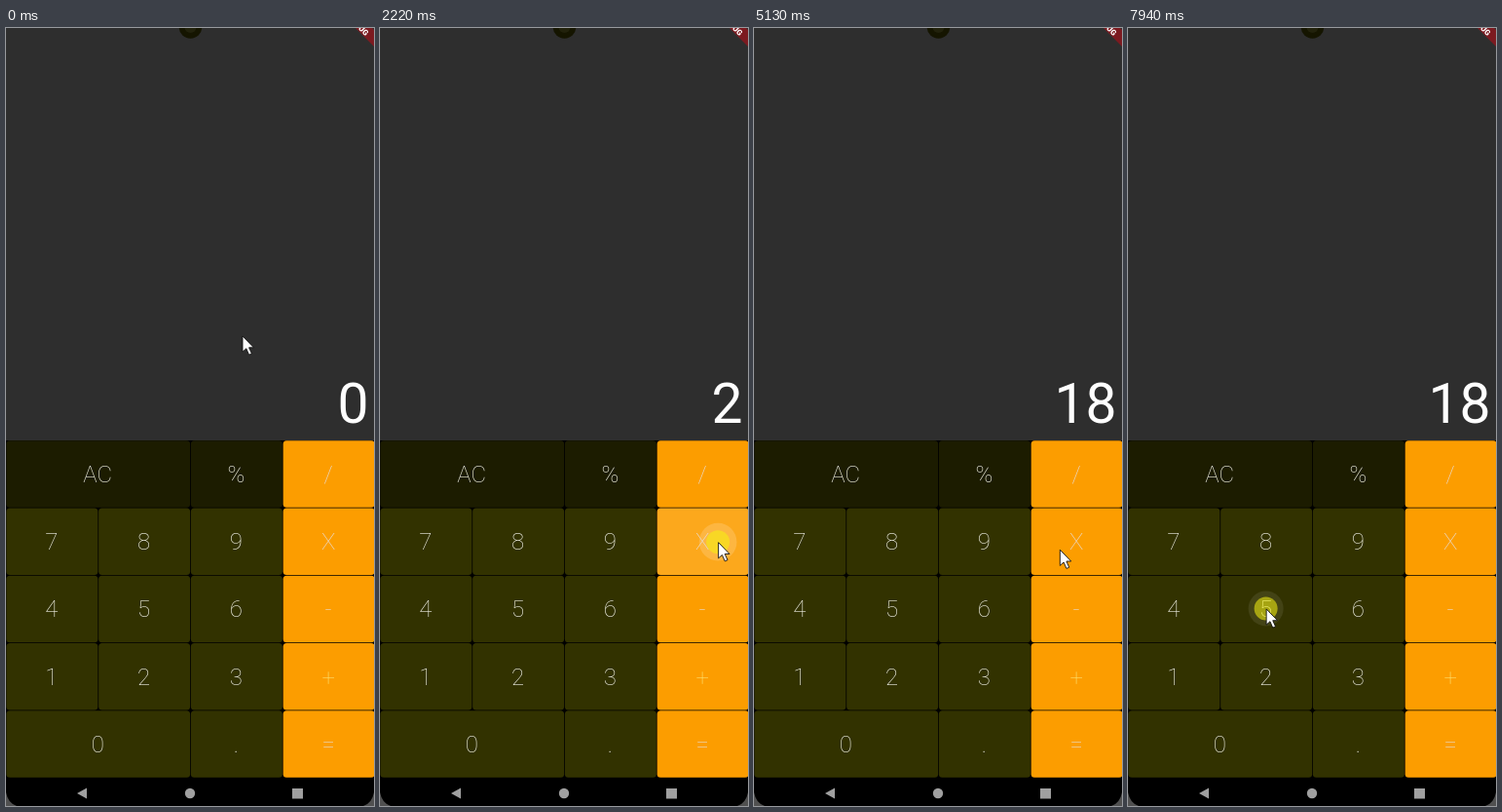
These frames come from a looping animation (378 px wide and 798 px high, 8 s). An HTML page:

```html
<!DOCTYPE html>
<html lang="en">
<head>
<meta charset="utf-8">
<title>Calculator</title>
<style>
html, body { margin: 0; height: 100%; overflow: hidden; background: #2e2e2e; }
svg { display: block; width: 100%; height: 100%; }
text { font-family: Roboto, sans-serif; }
#labels { font-size: 24px; font-weight: 200; text-anchor: middle; fill: #f0f0e6; }
#display { font-size: 57px; text-anchor: end; fill: #fff; }
#banner { font-size: 8px; font-weight: 900; text-anchor: end; fill: #fff; }
</style>
</head>
<body>
<svg viewBox="0 0 378 798">
  <clipPath id="clip"><rect id="clipRect" rx="3.5"/></clipPath>
  <rect width="378" height="798" fill="#2e2e2e"/>
  <circle cx="189.5" cy="-1" r="11.8" fill="#151500"/>
  <circle cx="189.5" cy="-1" r="6" fill="#22220c"/>
  <path d="M359 0H376L378 2V19Z" fill="#7c1a20"/>
  <text id="banner" transform="translate(369 8.3) rotate(45)">DEBUG</text>
  <text id="display" x="372.5" y="405">0</text>
  <path d="M0 423H378V798H0Z"/>
  <g id="keys"></g>
  <g id="ripple" clip-path="url(#clip)" fill="#fff">
    <rect id="glow" width="378" height="798"/>
    <circle id="splash"/>
  </g>
  <g id="labels"></g>
  <g fill="#a0a0a0">
    <path d="M73 785L83 779.5V790.5Z"/>
    <circle cx="189" cy="785" r="5.2"/>
    <rect x="294" y="780" width="11" height="10.5"/>
  </g>
  <path d="M0 784Q2 795 11 798H0ZM378 784Q376 795 367 798H378Z" fill="#505050"/>
  <circle id="press" r="12" fill="#f5f010" fill-opacity=".56"/>
  <path id="cursor" d="M0 0V16.2L3.8 12.8L6.6 19.2L9.4 18L6.6 11.8H11.4Z" fill="#fff" stroke="#111" stroke-width=".9"/>
</svg>
<script>
const LOOP = 8000, HOLD = 160, COL = 94.75, ROW = 69.25, TOP = 422.8, GAP = .4;
const $ = id => document.getElementById(id);
const clamp = v => Math.max(0, Math.min(1, v));
const set = (el, attrs) => {
  for (const name in attrs) el.setAttribute(name, attrs[name]);
  return el;
};
const add = (parent, tag, attrs) => parent.appendChild(
  set(document.createElementNS("http://www.w3.org/2000/svg", tag), attrs));

const keys = {};
["AC % /", "7 8 9 X", "4 5 6 -", "1 2 3 +", "0 . ="].forEach((line, row) => {
  let col = 0;
  for (const name of line.split(" ")) {
    const span = name === "AC" || name === "0" ? 2 : 1;
    const x = col * COL, y = TOP + row * ROW, width = span * COL;
    const orange = col === 3;
    const box = { x: x + GAP, y: y + GAP, width: width - 2 * GAP, height: ROW - 2 * GAP };
    keys[name] = { box, center: [x + width / 2, y + ROW / 2] };
    add($("keys"), "rect", { ...box, rx: 3.5,
      fill: orange ? "#fc9d00" : row ? "#323200" : "#1c1c00" });
    const label = add($("labels"), "text", { x: x + width / 2 - .5, y: y + 43 });
    label.textContent = name;
    if (orange) label.setAttribute("fill", name === "+" ? "#fce070" : "#e8dcd0");
    col += span;
  }
});

// Each tap: key, offset from its centre, press time, travel time and the
// control points that bend the way there
const taps = [
  { key: "2", off: [3, 3], at: 1260, travel: 950, bend: [[330, 450], [140, 830]], shows: "2" },
  { key: "X", off: [16, 1], at: 2140, travel: 640, bend: [[370, 560], [370, 560]] },
  { key: "9", off: [1, 3], at: 3030, travel: 640, bend: [[300, 640], [140, 600]], shows: "9" },
  { key: "=", off: [15, 17], at: 3940, travel: 600, bend: [[370, 680], [370, 680]], shows: "18" },
  { key: "X", off: [0, 5], at: 6230, travel: 1250, bend: [[259, 614], [254, 541]] },
  { key: "5", off: [0, 0], at: 7940, travel: 1300, bend: [[245, 790], [-65, 600]] }
];
let from = [243, 316], leave = 80;
for (const tap of taps) {
  const to = keys[tap.key].center.map((c, i) => c + tap.off[i]);
  Object.assign(tap, { from, to, leave, up: tap.at + HOLD });
  from = to;
  leave = tap.up;
}

function pointerAt(t) {
  const { from, to, leave, travel, bend: [a, b] } = taps.findLast(p => p.leave <= t) || taps[0];
  const s = clamp((t - leave) / travel), u = s * s * (3 - 2 * s), v = 1 - u;
  return [0, 1].map(i =>
    v ** 3 * from[i] + 3 * v * v * u * a[i] + 3 * v * u * u * b[i] + u ** 3 * to[i]);
}

function draw(t) {
  const [x, y] = pointerAt(t);
  set($("cursor"), { transform: `translate(${x} ${y})` });

  const tap = taps.findLast(p => p.at <= t);
  const shown = taps.findLast(p => p.shows && p.up <= t);
  $("display").textContent = shown ? shown.shows : "0";
  const pressed = tap && t < tap.up;
  set($("press"), { cx: x - .5, cy: y - .5, visibility: pressed ? "visible" : "hidden" });
  set($("ripple"), { visibility: tap ? "visible" : "hidden" });
  if (!tap) return;

  const held = t - tap.at, after = t - tap.up, rise = clamp(held / 80);
  set($("clipRect"), keys[tap.key].box);
  set($("ripple"), { opacity: 1 - clamp((after - 400) / 250) });
  set($("glow"), { opacity: .11 * rise });
  set($("splash"), { cx: tap.to[0] - .5, cy: tap.to[1] - .5, opacity: .08 + .08 * rise,
    r: 18 + held / 60 + 90 * clamp(after / 225) });
}

function tick() {
  draw(performance.now() % LOOP);
  requestAnimationFrame(tick);
}
tick();
</script>
</body>
</html>
```
